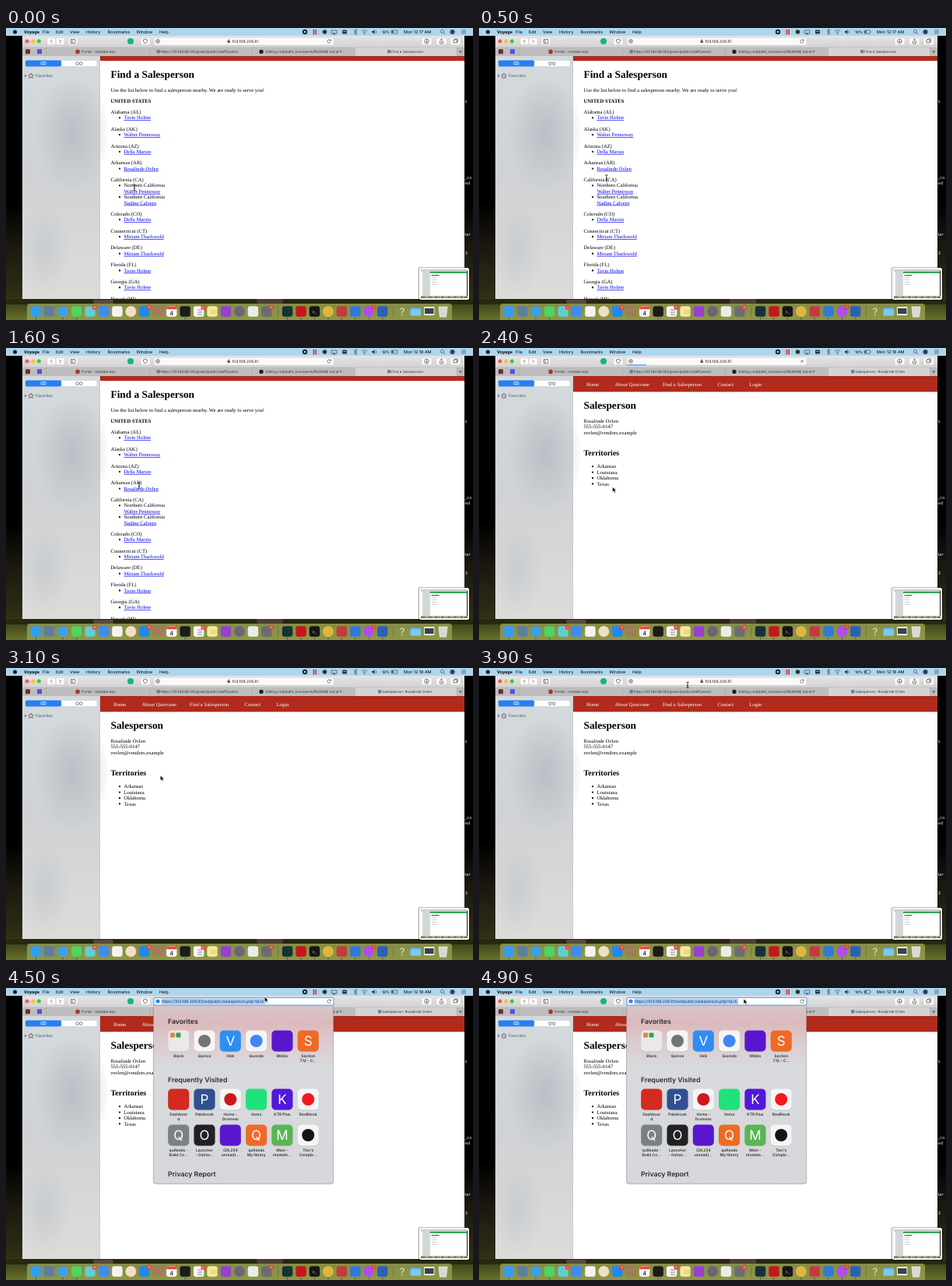
An HTML page for the animation above (5 s loop, 600 by 375 pixels).

```html
<!DOCTYPE html>
<html lang="en">
<head>
<meta charset="utf-8">
<title>Find a Salesperson</title>
<style>
html, body { margin: 0; width: 100%; height: 100%; overflow: hidden; background: #000; }
svg { display: block; width: 600px; height: 375px; font-family: Inter, sans-serif; text-rendering: geometricPrecision; }
.serif { font-family: "Liberation Serif", serif; }
.line { fill: none; stroke: #4a4a4a; stroke-width: .7; }
</style>
</head>
<body>
<svg id="stage" viewBox="0 0 600 375" xmlns="http://www.w3.org/2000/svg"></svg>
<script>
const rect = (x, y, w, h, fill, r = 0, more = '') =>
  `<rect x="${x}" y="${y}" width="${w}" height="${h}" rx="${r}" fill="${fill}" ${more}/>`;
const dot = (x, y, r, fill) => `<circle cx="${x}" cy="${y}" r="${r}" fill="${fill}"/>`;
const text = (x, y, s, size, more = '') =>
  `<text x="${x}" y="${y}" font-size="${size}" ${more}>${s}</text>`;
const line = (d, more = '') => `<path class="line" d="${d}" ${more}/>`;
const group = (id, body, more = '') => `<g id="${id}" ${more}>${body}</g>`;
const bold = 'font-weight="700"', semi = 'font-weight="600"', mid = 'text-anchor="middle"';
const RED = '#b12a1c', BODY = 6.65, ROW = 7.38;

const defs = `<defs>
  <linearGradient id="desk" x2="0" y2="1">
    <stop offset=".6" stop-color="#000"/><stop offset=".72" stop-color="#17140c"/>
    <stop offset=".92" stop-color="#302f16"/><stop offset="1" stop-color="#66732a"/>
  </linearGradient>
  <linearGradient id="dock" x2="0" y2="1">
    <stop offset="0" stop-color="#878b48"/><stop offset="1" stop-color="#8f9a45"/>
  </linearGradient>
  <linearGradient id="side" x2="0" y2="1">
    <stop offset="0" stop-color="#d3dade"/><stop offset=".5" stop-color="#d0d2d5"/>
    <stop offset="1" stop-color="#dcdcda"/>
  </linearGradient>
  <radialGradient id="haze"><stop offset="0" stop-color="#b9bfc5"/>
    <stop offset="1" stop-color="#b9bfc5" stop-opacity="0"/></radialGradient>
  <linearGradient id="sheet" x2="0" y2="1">
    <stop offset="0" stop-color="#d5c6c8"/><stop offset=".1" stop-color="#dcb9bb"/>
    <stop offset=".22" stop-color="#dbcdd0"/><stop offset=".36" stop-color="#d9dade"/>
    <stop offset="1" stop-color="#d6d7da"/>
  </linearGradient>
  <linearGradient id="bar" x2="0" y2="1">
    <stop offset="0" stop-color="#e6e5e6"/><stop offset="1" stop-color="#d3d2d3"/>
  </linearGradient>
  <clipPath id="view"><rect x="121" y="36" width="468" height="312"/></clipPath>
</defs>`;

function desktop() {
  const scraps = [['s', 96], ['_co', 194], ['ed', 201], ['ter', 267], ['3', 291]];
  return rect(0, 0, 600, 375, 'url(#desk)') +
    scraps.map(([s, y]) => text(589.5, y, s, 5.6, 'fill="#ddd"')).join('');
}

function menuBar() {
  const items = [['File', 47], ['Edit', 64], ['View', 82], ['History', 103],
    ['Bookmarks', 130.5], ['Window', 167.5], ['Help', 197]];
  return rect(0, 0, 600, 10, '#acd6ef') + dot(11.5, 5, 2.6, '#222') +
    text(23, 7, 'Voyage', 5.4, bold) +
    items.map(([s, x]) => text(x, 7, s, 5.4)).join('') +
    dot(384, 5, 3.2, '#222') + dot(384, 5, 1.3, '#acd6ef') +
    rect(394.5, 2, 1.7, 6.4, '#d8322b') + rect(397.3, 2, 1.7, 6.4, '#d8322b') +
    dot(409.5, 5, 2.8, '#333') + line('M418 3h7v4h-7zM420 8l1.5-2 1.5 2z') +
    rect(432, 2.5, 6, 5, '#333', 1) + rect(433, 4, 4, .7, '#acd6ef') +
    line('M447 3.5l4 3.5-2 1.5V1.5l2 1.5-4 3.5') +
    line('M457 4q3.5-3 7 0M458.5 5.8q2-1.6 4 0', 'stroke="#222"') + dot(460.5, 7.4, .7, '#222') +
    '<path d="M470 4h1.5l2-2v6l-2-2H470z" fill="#333"/>' + line('M475 3q2 2 0 4') +
    text(483, 7, '18%', 4.9) + rect(495, 3, 8, 4, 'none', 1, 'stroke="#333" stroke-width=".6"') +
    rect(495.7, 3.6, 1.8, 2.8, '#333') +
    group('clock', text(511, 7, '', 5.4)) +
    '<circle class="line" cx="560.5" cy="4.4" r="2"/>' + line('M562 6l2 2') +
    dot(573.5, 5, 3, '#3b3566') + line('M585 3h6M585 5h6M585 7h6');
}

function tab(x, title, color, width = 4.4) {
  return rect(x, 28, width, 4.6, color, 1) + text(x + 5.3, 32.1, title, 4.55, 'fill="#333"');
}

function windowFrame() {
  const button = (x, w) => rect(x, 12.6, w, 9, '#fbfbfb', 1.6, 'stroke="#c3c3c3" stroke-width=".4"');
  return rect(21, 10, 568, 338, '#fff') + rect(21, 10, 568, 15, 'url(#bar)') +
    dot(27, 17, 2.5, '#fc5b57') + dot(34.7, 17, 2.5, '#fdbc40') + dot(42.3, 17, 2.5, '#34c84a') +
    button(53, 10.7) + button(64.3, 10.7) + line('M59.3 15l-2 2.1 2 2.1M68.6 15l2 2.1-2 2.1') +
    button(80, 12) + line('M83 14.7h6v5h-6zM85 14.7v5') +
    dot(160, 17, 4, '#14b488') + button(173, 12) +
    line('M179 14.2l2.4.8v2q-.3 2-2.4 2.9-2.1-.9-2.4-2.9v-2z') +
    button(534, 13) + '<circle class="line" cx="540.5" cy="17" r="2.8"/>' +
    line('M540.5 15.3v3.2M539.2 17.3l1.3 1.3 1.3-1.3') +
    button(553, 13) + line('M557.5 16.5v3.5h4v-3.5M559.5 18.5V14M558.2 15.2l1.3-1.3 1.3 1.3') +
    button(571, 13) + line('M575 15h4v4h-4zM576.5 15v-1h4v4h-1.5') +
    rect(21, 25, 568, 11, '#bdbdbd') + rect(448, 25, 131, 11, '#d4d4d4') +
    [51, 184, 316, 448, 579].map(x => rect(x, 25, .5, 11, '#a2a2a2')).join('') +
    rect(21, 24.8, 568, .4, '#aaa') +
    rect(25, 27.2, 6, 6, '#75263c', 1) + rect(40, 27.2, 6, 6, '#5a49e8', 1) +
    dot(92, 30.4, 2.8, '#b3322b') + text(97, 32.1, 'Portal - msstate.edu', 4.55, 'fill="#333"') +
    tab(193.5, 'https://35.184.88.145/green/public/staff/users/...', '#6d7f96') +
    dot(328, 30.4, 2.7, '#222') +
    text(333.5, 32.1, 'Editing codepath_homework/README.md at P...', 4.5, 'fill="#333"') +
    line('M582 30.5h4M584 28.5v4');
}

function sidebar() {
  return rect(21, 36, 100, 312, 'url(#side)') +
    '<ellipse cx="85" cy="135" rx="48" ry="75" fill="url(#haze)"/>' +
    '<ellipse cx="50" cy="285" rx="32" ry="60" fill="url(#haze)" opacity=".5"/>' +
    rect(25, 41.5, 92, 8, '#fff', 1.8, 'stroke="#bbb" stroke-width=".4"') +
    rect(25, 41.5, 46, 8, '#2680f2', 1.8) +
    line('M48 44q-2-1-3 0v3q1-1 3 0 2-1 3 0v-3q-1-1-3 0v3', 'style="stroke:#fff"') +
    '<circle class="line" cx="91.5" cy="45.6" r="1.8"/><circle class="line" cx="96.2" cy="45.6" r="1.8"/>' +
    '<path d="M24.2 59.5v4l2.7-2z" fill="#777"/>' +
    line('M32 58l1 2.2 2.4.2-1.8 1.6.6 2.4-2.2-1.3-2.2 1.3.6-2.4-1.8-1.6 2.4-.2z') +
    text(38, 63.4, 'Favorites', 5.1, 'fill="#555"') + rect(120.6, 36, .4, 312, '#b5b5b5');
}

const bullet = y => dot(146, y - 2.1, 1.15, '#000');

function listPage() {
  const link = (s, y) => text(151.4, y, s, BODY, 'fill="#0000ee" text-decoration="underline"');
  const [holm, penn, dell, ovlen, nad, thack] = ['Tavin Holme', 'Walter Pennoway',
    'Della Marsin', 'Rosalinde Ovlen', 'Nadine Calvero', 'Miriam Thackwold'];
  const states = [['Alabama (AL)', holm], ['Alaska (AK)', penn], ['Arizona (AZ)', dell],
    ['Arkansas (AR)', ovlen], ['California (CA)', [['Northern California', penn], ['Southern California', nad]]],
    ['Colorado (CO)', dell], ['Connecticut (CT)', thack], ['Delaware (DE)', thack],
    ['Florida (FL)', holm], ['Georgia (GA)', holm], ['Hawaii (HI)', holm]];
  let y = 110, out = rect(121, 36, 468, 6.2, RED) +
    text(134.5, 63.6, 'Find a Salesperson', 13.35, bold) +
    text(134.5, 81.8, 'Use the list below to find a salesperson nearby. We are ready to serve you!', BODY) +
    text(134.5, 96, 'UNITED STATES', BODY, bold);
  for (const [state, who] of states) {
    out += text(134.5, y, state, BODY);
    y += ROW;
    if (typeof who === 'string') {
      out += bullet(y) + link(who, y);
      y += ROW;
    } else for (const [part, name] of who) {
      out += bullet(y) + text(151.4, y, part, BODY) + link(name, y + ROW);
      y += 2 * ROW;
    }
    y += 7;
  }
  return group('list', `<g class="serif" clip-path="url(#view)">${out}</g>` +
    tab(490, 'Find a Salesperson', '#77808c'));
}

function personPage() {
  const nav = [['Home', 138], ['About Quorvane', 174.5], ['Find a Salesperson', 236],
    ['Contact', 306.5], ['Login', 347.5]];
  const out = rect(121, 36, 468, 20.3, RED) +
    nav.map(([s, x]) => text(x, 48.8, s, BODY, 'fill="#fff"')).join('') +
    text(134.5, 77.8, 'Salesperson', 13.35, bold) +
    ['Rosalinde Ovlen', '555-555-0147', 'rovlen@vendors.example']
      .map((s, i) => text(134.5, 96 + i * ROW, s, BODY)).join('') +
    text(134.5, 137.5, 'Territories', 10, bold) +
    ['Arkansas', 'Louisiana', 'Oklahoma', 'Texas'].map((s, i) => {
      const y = 154.2 + i * 7.45;
      return bullet(y) + text(151.4, y, s, BODY);
    }).join('');
  return group('person', `<g class="serif">${out}</g>` +
    tab(478, 'Salesperson: Rosalinde Ovlen', '#77808c'));
}

function address() {
  return rect(190, 12.3, 231, 9.8, '#fafafa', 1.8, 'stroke="#c2c2c2" stroke-width=".4"') +
    group('idle', '<circle class="line" cx="195" cy="17" r="2.4"/>' + line('M193.7 17h2.6M195 15.7v2.6') +
      rect(284.5, 16.3, 3.4, 2.8, '#555', .5) + line('M285.2 16.4v-1q1-1.3 2 0v1') +
      text(290, 18.9, '104.198.208.81', 5, 'fill="#222"')) +
    group('reload', line('M417 16a2.2 2.2 0 1 0 .1 2M417.4 14.6v1.7h-1.7')) +
    group('stop', line('M413.5 15.5l3 3M416.5 15.5l-3 3')) +
    rect(190, 21.3, 0, .9, '#2b82f5', 0, 'id="progress"');
}

function popup() {
  const rows = [
    [54.5, [['Black', '#e9e9ea'], ['Quince', '#747478', 'o'], ['Velk', '#2f8df4', 'V'],
      ['Quondo', '#4285f4', 'o'], ['Wibbo', '#5a16cf', ''], ['Section|7.12 - C...', '#ee6a26', 'S']]],
    [129.5, [['Dashboar|d', '#d42a1f', ''], ['Palebrook', '#31508f', 'P'], ['Home -|Drumvex', '#d3141d', 'o'],
      ['Vemo', '#1fe37a', ''], ['KTR Plus', '#5019d8', 'K'], ['ReelNook', '#f2191c', 'o']]],
    [175.5, [['quReads -|Build Co...', '#7b8088', 'Q'], ['Launcher|- Ostrav...', '#212123', 'O'],
      ['(28,254|unread)...', '#5a16cf', ''], ['quReads|My library', '#ee6a26', 'Q'],
      ['Main -|msstate...', '#5bb455', 'M'], ["Two's|Comple...", '#151515', 'o']]]];
  // 'o' marks a coloured disc on a white tile; other marks are letters
  const tile = (x, y, [name, color, mark = '']) =>
    rect(x - 13.5, y + .7, 27, 27, '#0002', 5) +
    rect(x - 13.5, y, 27, 27, mark === 'o' ? '#f5f5f6' : color, 5) +
    (mark === 'o' ? dot(x, y + 13.5, 8, color) :
      text(x, y + 19.5, mark, 17, `${mid} fill="#fff"`)) +
    name.split('|').map((s, i) => text(x, y + 34.4 + i * 6, s, 4.9, `${mid} ${semi} fill="#333"`)).join('');
  const head = (y, s) => text(208, y, s, 8.7, `${semi} fill="#2b2b2d"`);
  return group('popup',
    rect(188.8, 22, 232.4, 230.3, '#0003', 4) +
    '<path d="M189.6 22h231v225q0 4-4 4h-223q-4 0-4-4z" fill="url(#sheet)" stroke="#999" stroke-width=".4"/>' +
    rect(190, 12.3, 231, 9.8, '#fff', 1.8, 'stroke="#71a9ef" stroke-width="1.3"') +
    rect(199.5, 13.4, 133.5, 7.6, '#a9cffb') + dot(195, 17, 2.6, '#3a83d8') +
    text(200, 18.9, 'https://104.198.208.81/red/public/salesperson.php?id=6', 5, 'fill="#234"') +
    line('M417 16a2.2 2.2 0 1 0 .1 2M417.4 14.6v1.7h-1.7') +
    head(46, 'Favorites') + head(121, 'Frequently Visited') + head(242, 'Privacy Report') +
    rows.map(([y, tiles]) => tiles.map((t, i) => tile(221.7 + i * 33.3, y, t)).join('')).join('') +
    rect(211, 57.5, 6, 6, '#d98a48', 1) + rect(218.5, 57.5, 6, 6, '#39a04c', 1));
}

function dock() {
  const colors = ['#359df0', '#5d7f9e', 'o#3ba0ec', '#4bd65e', '#63cbd2', '#3b8df3', '#f5f2f3',
    'o#f0dfc4', '#2188f1', '#a47b56', '#fafafa', '#1c1c1e', '#fafafa', '#fae79a', '#983fd4',
    'o#6b6578', '#e6ecf1', '#6c6c70', '', '#17313a', '#c4171c', '#151515', 'o#dfb83b', '#c33b3f',
    '#3179d6', 'o#ab50ef', '#2b60b8'];
  const x = i => 38.2 + i * 17.45 - (i > 18 ? 8.2 : 0);
  const icons = colors.map((c, i) => c[0] === 'o' ? dot(x(i), 364, 6.9, c.slice(1)) :
    c && rect(x(i) - 6.7, 357.3, 13.4, 13.4, c, 3)).join('');
  const badges = [4, 8, 12, 17, 25].map(i =>
    dot(x(i) + 5.8, 358.8, 3, '#f03b35') + text(x(i) + 5.8, 360.4, i === 25 ? 1 : 4, 4.2, `${mid} fill="#fff"`)).join('');
  const running = [0, 2, 3, 11, 19, 20, 21, 22, 23, 24, 25, 26].map(i => dot(x(i), 373, .7, '#222')).join('');
  return rect(0, 348, 600, 7, '#29280f') +
    rect(322, 348, 34, 6, '#4b4032', 2) + rect(112, 349, 26, 5, '#584b39', 2) +
    rect(27, 354, 546, 24, 'url(#dock)', 4) + icons + badges + running +
    rect(206.2, 357.5, 13.4, 3.8, '#e84d42', 1.5) + text(212.7, 368.8, '4', 7.5, mid) +
    line('M246 362h6M246 365h6M246 368h6') + line('M263 363h10M263 366h10', 'opacity=".4"') +
    text(396, 366, '&gt;_', 5, `${mid} fill="#fff"`) +
    rect(349, 358, .5, 13, '#555') + rect(497.5, 358, .5, 13, '#555') +
    text(509, 369, '?', 13, `${mid} fill="#e1e5c4"`) +
    rect(519.5, 359, 13.5, 10.5, '#58aee0', 1.5) + rect(519.5, 361, 13.5, 8.5, '#7dc8ee', 1.5) +
    rect(537, 358, 13.5, 11, '#eee', 1) + rect(538, 360, 11.5, 7, '#38434a') +
    '<path d="M556 358h11l-1.4 13h-8.2z" fill="#d5d9d5" stroke="#f2f2f2" stroke-width=".7"/>';
}

function thumbnail() {
  return rect(529.5, 307, 67, 43.5, '#0004', 3) + rect(531, 308, 64, 41, '#f8f8f8', 2.5) +
    rect(533, 310, 60, 37, '#fff') + rect(533, 310, 60, 2.8, '#c9ccd0') +
    rect(535, 312.8, 10, 31, '#d4d7d8') + rect(545, 312.8, 47, 2.2, '#35a853') +
    rect(546.5, 317, 10, 1.2, '#555') +
    [320, 323, 326, 329].map(y => rect(546.5, y, 7, .6, '#aaa')).join('') +
    rect(592, 312, 1, 32, '#222') + rect(533, 344.3, 60, 2.7, '#75804a') +
    Array.from({length: 20}, (_, i) => rect(536 + i * 2.7, 345, 1.5, 1.3, i % 3 ? '#e6e6e6' : '#4b83bb')).join('');
}

const pointers =
  group('beam', '<path d="M-1.7-3.8q1.7 0 1.7 1.2V2.6q0 1.2-1.7 1.2M1.7-3.8q-1.7 0-1.7 1.2M1.7 3.8Q0 3.8 0 2.6M-1 .9h2" ' +
    'fill="none" stroke="#111" stroke-width=".8"/>') +
  group('arrow', '<path d="M0 0v6.6l1.6-1.5 1.1 2.4 1.2-.5-1.1-2.4H5z" fill="#000" stroke="#fff" stroke-width=".5"/>') +
  group('hand', '<path d="M-.6-3q.6-.8 1.2 0v2.6l3 .7q.8.3.6 1.4L3.5 4.8H-.4L-2.6 1.6q0-1 1-.6l1 .9z" fill="#fff" stroke="#000" stroke-width=".5"/>');

const $ = id => document.getElementById(id);
$('stage').innerHTML = defs + desktop() + windowFrame() + sidebar() + listPage() + personPage() +
  address() + popup() + menuBar() + dock() + thumbnail() + group('cursor', pointers);

// time, x, y of the pointer; its shape holds until the next entry
const path = [
  [0, 165, 205, 'beam'], [200, 165, 205, 'beam'], [700, 163, 184, 'beam'], [1000, 162.7, 171, 'beam'],
  [1300, 167, 173, 'beam'], [1600, 171, 176.5, 'beam'], [1800, 172, 179, 'hand'],
  [2200, 171.5, 178.5, 'arrow'], [2700, 171.5, 178.5, 'arrow'], [3200, 205, 128, 'arrow'],
  [3600, 254, 47, 'arrow'], [3800, 267, 23, 'beam'], [4000, 269, 20.5, 'beam'],
  [4200, 286, 17, 'arrow'], [4500, 332.3, 11.5, 'arrow'], [4900, 340, 14, 'arrow'], [5000, 340, 14, 'arrow']];

const show = (id, on) => $(id).style.display = on ? '' : 'none';

function frame(now) {
  const t = Math.floor(now % 5000 / 100) * 100;
  const i = path.findIndex(p => p[0] > t);
  const [t0, x0, y0, shape] = path[i - 1], [t1, x1, y1] = path[i];
  const k = (t - t0) / (t1 - t0);
  $('cursor').setAttribute('transform', `translate(${x0 + (x1 - x0) * k} ${y0 + (y1 - y0) * k})`);
  for (const id of ['beam', 'arrow', 'hand']) show(id, id === shape);

  const loading = t >= 2100 && t < 2800, opened = t >= 2200, typing = t >= 4200;
  show('list', !opened);
  show('person', opened);
  show('popup', typing);
  show('idle', !typing);
  show('stop', loading);
  show('reload', !loading && !typing);
  $('progress').setAttribute('width', !loading ? 0 : t <= 2400 ? 10 + (t - 2100) / 20 : 25 + (t - 2400) * .6);
  $('clock').firstChild.textContent = `Mon 12:${t < 1300 ? 17 : 18} AM`;
  requestAnimationFrame(frame);
}
const start = performance.now();
requestAnimationFrame(now => frame(Math.max(0, now - start)));
</script>
</body>
</html>
```
